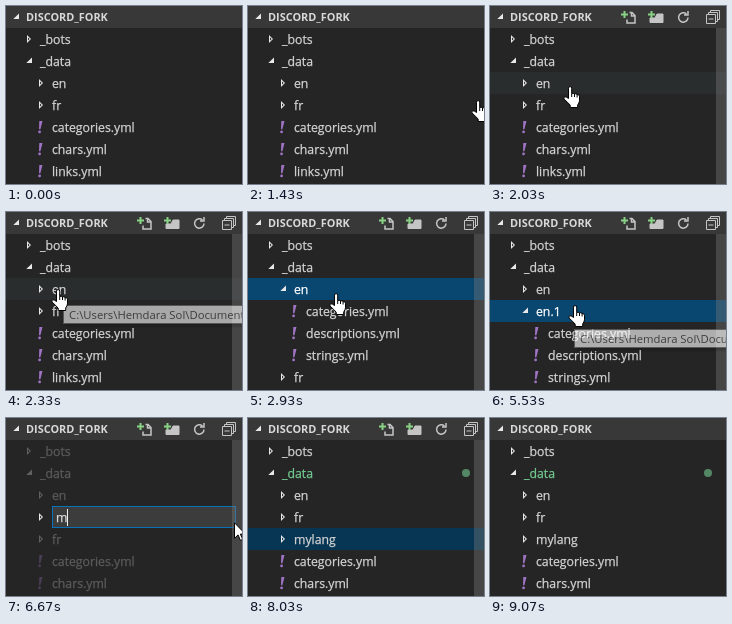
These frames come from a looping animation (236x178 px, 9130 ms). An HTML page:

```html
<!DOCTYPE html>
<html lang="en">
<head>
<meta charset="utf-8">
<title>File explorer</title>
<style>
  html, body { margin: 0; width: 100%; height: 100%; overflow: hidden; background: #252526; }
  body { position: relative; color: #d4d4d4; font: 12.25px/22px "Open Sans", "Noto Sans", sans-serif; cursor: default; }
  svg { position: absolute; overflow: visible; }
  header { position: absolute; inset: 0 0 auto; height: 22px; background: #383838; }
  header b { position: absolute; left: 20px; font-size: 10.9px; color: #d8d8d8; }
  .row, #hover { position: absolute; left: 0; width: 100%; height: 22px; white-space: pre; }
  .row span { position: absolute; top: 1px; -webkit-text-stroke: .25px currentColor; }
  #hover { background: #2a2d2e; }
  .sel { background: #094771; color: #fff; }
  .focus { background: #073655; }
  .dim { opacity: .3; }
  .new { color: #73c991; }
  .new::after { content: ""; position: absolute; left: 214px; top: 7px; width: 8px; height: 8px; border-radius: 50%; background: currentColor; opacity: .6; }
  .row .edit { top: 0; left: 46px; width: 179px; height: 20px; padding-left: 3px; border: 1px solid #0a72b8; background: #3c3c3c; color: #ddd; line-height: 21px; }
  .edit i { font-style: normal; border-right: 1px solid #eee; }
  .edit mark { color: #fff; background: #264f78; }
  #bar { position: absolute; top: 22px; right: 0; bottom: 0; width: 10px; background: #79797966; }
  #tip { position: absolute; box-sizing: border-box; width: 420px; height: 19px; padding-left: 5px; white-space: pre;
    font-size: 11.3px; line-height: 17px; color: #4c4c4c; background: #fff; border: 1px solid #767676; box-shadow: 2px 2px 3px #0006; }
  #hand, #arrow { left: 0; top: 0; }
</style>
</head>
<body>
<header>
  <svg width="16" height="16" style="left:2px;top:3px"><path fill="#e8e8e8" d="M11 10H5.3L11 4.4z"/></svg>
  <b>DISCORD_FORK</b>
  <svg id="tools" width="236" height="22" style="left:0;top:0" fill="none" stroke="#c5c5c5" stroke-width="1.5">
    <path d="M139.5 6.5h2.500l3 3v7.500h-8v-3.500M141.500 6.500v3.500h3.500"/>
    <path d="M160 12h5l2-4h6v8.500h-13z" fill="#c5c5c5" stroke-width="1"/>
    <path d="M196.500 8a4.700 4.700 0 1 0 1.500 3.500M198 5v4h-4"/>
    <path d="M220.500 6.500v-2h9v9h-2M218.500 8.500v-2h9v9h-2M216.500 8.500h9v9h-9zM218.500 13h5" stroke-width="1"/>
    <path d="M134.500 5v7M131 8.500h7M161.500 5v7M158 8.500h7" stroke="#89d185" stroke-width="2"/>
  </svg>
</header>
<div id="hover"></div>
<main id="tree"></main>
<div id="bar"></div>
<div id="tip">C:\Users\Hemdara Sol\Documents\</div>
<svg id="hand" width="18" height="23" stroke="#000" stroke-width="1">
  <path fill="#fff" d="M5.500 12.500V2.200a1.600 1.600 0 0 1 3.200 0V7.500q1.500-.8 2.800.4 1.600-.6 2.600.6 2.300-.2 2.400 1.800v4.500q-.3 2.200-1.800 4.200v2.500H7.200v-2.300Q5 16.500 1 13q-.8-1.900 1-2.200 1.500 0 3.500 1.700z"/>
  <path d="M8.700 7.500v3.500M11.500 8v3M14.100 8.500v3" fill="none"/>
</svg>
<svg id="arrow" width="13" height="20">
  <path fill="#fff" stroke="#000" d="M.5 .8v15.500l3.600-3.400 2.300 5.500 2.300-1-2.300-5.300h5z"/>
</svg>
<script>
const LOOP = 9130, ROW = 22;
const $ = id => document.getElementById(id);
const tree = $('tree'), tip = $('tip'), hand = $('hand'), arrow = $('arrow');
const tools = $('tools'), hover = $('hover'), bar = $('bar');

// Row: name, depth, open (undefined for files), class
const dir = (name, depth, cls = '', open = false) => ({ name, depth, cls, open });
const file = (name, depth = 2) => ({ name: name + '.yml', depth, cls: '' });
const edit = html => ({ ...dir('', 2), html });

const inner = ['categories', 'descriptions', 'strings'].map(n => file(n, 3));
const outer = ['categories', 'chars', 'links'].map(n => file(n));
const en = dir('en', 2), fr = dir('fr', 2), enSel = dir('en', 2, 'sel');
const copy = (cls, open) => dir('en.1', 2, cls, open);
const top2 = cls => [dir('_bots', 1), dir('_data', 1, cls, true)];
const list = (...rows) => [...top2(''), ...rows];
const listNew = (...rows) => [...top2('new'), ...rows];
const typed = s => edit(`<i>${s}</i>`);

const scenes = [
  [0, list(en, fr, ...outer)],
  [2630, list(dir('en', 2, 'sel', true), ...inner, fr)],
  [3600, list(enSel, fr, ...outer)],
  [4330, list(enSel, copy('focus'), fr, ...outer)],
  [5270, list(en, copy('sel', true), ...inner)],
  [5700, list(en, copy('sel'), fr, ...outer)],
  [5970, list(en, edit('<mark>en.1</mark>'), fr, ...outer)],
  [6670, list(en, typed('m'), fr, ...outer)],
  [6730, list(en, typed('my'), fr, ...outer)],
  [6870, list(en, typed('myl'), fr, ...outer)],
  [6900, listNew(en, typed('myl'), fr, ...outer)],
  [7100, listNew(en, typed('myla'), fr, ...outer)],
  [7200, listNew(en, typed('mylan'), fr, ...outer)],
  [7300, listNew(en, typed('mylang'), fr, ...outer)],
  [7430, listNew(en, copy('sel'), fr, ...outer)],
  [7470, listNew(en, fr, dir('mylang', 2, 'focus'), ...outer)],
  [9070, listNew(en, fr, dir('mylang', 2), ...outer)]
];

const icon = row => {
  if (row.open === undefined)
    return '<path fill="#a074c4" d="M6.300 2h3.200L7.400 10.300H6zM5.200 12.900a1.400 1.400 0 1 1 2.800 0a1.400 1.400 0 1 1-2.800 0"/>';
  return `<path fill="#e8e8e8" d="${row.open ? 'M11 10H5.300L11 4.400z' : 'M6 4v8l4-4zm1 2.400L8.600 8 7 9.600z'}"/>`;
};

function draw(rows) {
  const editing = rows.some(r => r.html);
  tree.innerHTML = rows.slice(0, 7).map((r, i) => {
    const x = 22 + 12 * r.depth;
    const dim = editing && !r.html ? 'dim' : '';
    const label = r.html ? `<span class="edit">${r.html}</span>` : `<span style="left:${x}px">${r.name}</span>`;
    return `<div class="row ${r.cls} ${dim}" style="top:${ROW + ROW * i}px">` +
      `<svg width="16" height="16" style="left:${x - 19}px;top:3px">${icon(r)}</svg>${label}</div>`;
  }).join('');
}

// Moves: start, end, from, to
const handMoves = [
  [1430, 2230, [223, 94], [45, 77]],
  [2640, 3070, [45, 77], [93, 82]],
  [3310, 3430, [93, 82], [85, 77]],
  [4800, 5030, [85, 77], [78, 93]],
  [5950, 6130, [78, 93], [222, 104]]
];
const arrowMoves = [
  [6130, 6170, [228, 104], [228, 104]],
  [7950, 8070, [228, 104], [238, 107]]
];
// Tooltips: start, end, x, y
const tips = [
  [2210, 2630, 57, 93],
  [3900, 4330, 91, 101],
  [5405, 5700, 84, 117]
];

const last = (items, t) => items.filter(m => m[0] <= t).pop();
const clamp = k => Math.max(0, Math.min(1, k));
const ease = k => k * k * (3 - 2 * k);
const show = (el, on) => { el.style.display = on ? '' : 'none'; };

function place(el, moves, t, shown) {
  const m = last(moves, t);
  show(el, shown && m);
  if (!m) return 0;
  const k = ease(clamp((t - m[0]) / (m[1] - m[0])));
  const [x, y] = m[2].map((a, i) => Math.round(a + (m[3][i] - a) * k));
  el.style.transform = `translate(${x}px,${y}px)`;
  return y;
}

let shownScene;
const start = performance.now();

function tick() {
  const t = (performance.now() - start) % LOOP;
  const scene = last(scenes, t);
  if (scene !== shownScene) draw((shownScene = scene)[1]);
  show(tools, t >= 1470 && t < 8230);

  const y = place(hand, handMoves, t, t < 6130);
  place(arrow, arrowMoves, t, t < 8070);
  show(hover, t >= 1470 && t < 5970);
  hover.style.top = Math.floor(y / ROW) * ROW + 'px';
  bar.style.opacity = Math.min(clamp((t - 1470) / 100), clamp((8930 - t) / 700));

  const p = last(tips, t);
  show(tip, p && t < p[1]);
  if (p) {
    tip.style.opacity = clamp((t - p[0]) / 200);
    tip.style.left = p[2] + 'px';
    tip.style.top = p[3] + 'px';
  }
  requestAnimationFrame(tick);
}
tick();
</script>
</body>
</html>
```
